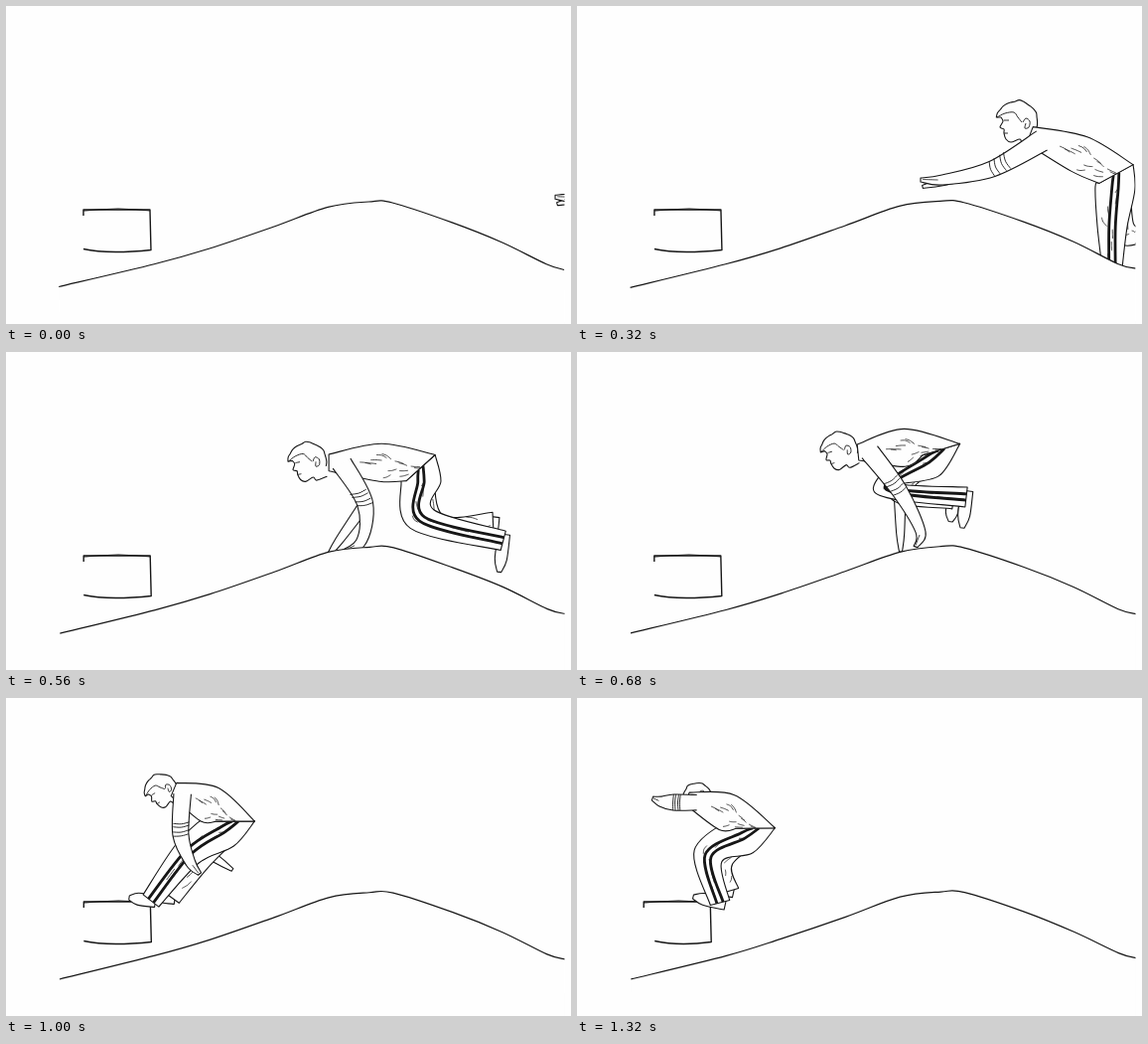
Recreate the animation shown at these times as an HTML page with a canvas. Size 569 by 320 pixels, loop 1.36 s.

```html
<!DOCTYPE html>
<html lang="en">
<head>
<meta charset="utf-8">
<title>Vault</title>
<style>
  html, body { margin: 0; width: 100%; height: 100%; overflow: hidden; background: #fefefe; }
  canvas { display: block; }
</style>
</head>
<body>
<canvas id="stage" width="569" height="320"></canvas>
<script>
const ctx = document.getElementById('stage').getContext('2d');
const LOOP = 1360, STEP = 40, RUN_END = 320, LANDING = 1000, REST = 1320;
const INK = '#161616', PAPER = '#fefefe';

// Joints at the key moments; the rest of the body is built from them.
const poses = [
  { at: RUN_END, head: [443, 116], neck: [456, 130], hip: [543, 169], knee: [539, 222], ankle: [539, 264],
    toe: [519, 274], farAnkle: [572, 229], elbow: [418, 164], wrist: [368, 175], hand: [346, 175], farHand: [348, 182] },
  { at: 480, head: [336, 116], neck: [358, 118], hip: [454, 133], knee: [483, 190], ankle: [552, 225],
    toe: [544, 252], farAnkle: [551, 191], elbow: [384, 159], wrist: [361, 192], hand: [322, 202], farHand: [326, 202] },
  { at: 680, head: [264, 99], neck: [283, 101], hip: [367, 98], knee: [314, 137], ankle: [392, 146],
    toe: [388, 177], farAnkle: [379, 149], elbow: [325, 140], wrist: [346, 181], hand: [341, 196], farHand: [326, 201] },
  { at: 840, head: [202, 88], neck: [220, 87], hip: [298, 104], knee: [230, 124], ankle: [237, 186],
    toe: [206, 185], farAnkle: [262, 182], elbow: [273, 108], wrist: [308, 127], hand: [331, 122], farHand: [332, 151] },
  { at: LANDING, head: [156, 93], neck: [169, 92], hip: [231, 124], knee: [184, 155], ankle: [146, 204],
    toe: [124, 201], farAnkle: [167, 201], elbow: [176, 138], wrist: [186, 166], hand: [195, 177], farHand: [228, 173] },
  { at: REST, head: [121, 100], neck: [111, 101], hip: [180, 131], knee: [132, 159], ankle: [144, 206],
    toe: [117, 200], farAnkle: [154, 194], elbow: [97, 105], wrist: [84, 104], hand: [76, 101], farHand: [115, 107] }
];

const hill = [[54, 283], [150, 260], [205, 244], [270, 222], [325, 202], [366, 197],
  [390, 198], [450, 218], [500, 238], [545, 260], [563, 265]];

const clamp = v => Math.max(0, Math.min(1, v));
const along = (a, b, k) => [a[0] + (b[0] - a[0]) * k, a[1] + (b[1] - a[1]) * k];
const add = (a, b, k = 1) => [a[0] + b[0] * k, a[1] + b[1] * k];
const unit = (a, b) => {
  const length = Math.hypot(b[0] - a[0], b[1] - a[1]) || 1;
  return [(b[0] - a[0]) / length, (b[1] - a[1]) / length];
};
const noise = n => { const v = Math.sin(n * 127.1) * 43758.5; return (v - Math.floor(v)) * 2 - 1; };

// Hermite blend of the joints; the landing settles to rest.
function jointsAt(t) {
  const last = poses.length - 1;
  let i = 0;
  while (i < last - 1 && t > poses[i + 1].at) i++;
  const span = poses[i + 1].at - poses[i].at, u = clamp((t - poses[i].at) / span), v = 1 - u;
  const slope = (name, axis, j) => {
    if (j === last) return 0;
    const a = poses[Math.max(0, j - 1)], b = poses[j + 1];
    return (b[name][axis] - a[name][axis]) / (b.at - a.at) * span;
  };
  const joints = {};
  for (const name of Object.keys(poses[0]).slice(1)) {
    joints[name] = [0, 1].map(axis =>
      poses[i][name][axis] * (1 + 2 * u) * v * v + poses[i + 1][name][axis] * u * u * (3 - 2 * u)
      + slope(name, axis, i) * u * v * v - slope(name, axis, i + 1) * u * u * v);
  }
  return joints;
}

// Both edges of a bent limb: every joint moved along its bisecting normal.
function edges(chain, widths) {
  const normals = chain.map((p, i) => {
    const before = i ? unit(chain[i - 1], p) : [0, 0];
    const after = i < chain.length - 1 ? unit(p, chain[i + 1]) : [0, 0];
    const [x, y] = unit([0, 0], add(before, after));
    return [y, -x];
  });
  return [1, -1].map(side => chain.map((p, i) => add(p, normals[i], side * widths[i])));
}

function curve(points) {
  const at = i => points[Math.max(0, Math.min(points.length - 1, i))];
  ctx.lineTo(...at(0));
  for (let i = 0; i < points.length - 1; i++) {
    const a = at(i - 1), b = at(i), c = at(i + 1), d = at(i + 2);
    ctx.bezierCurveTo(...add(b, add(c, a, -1), 1 / 6), ...add(c, add(d, b, -1), -1 / 6), ...c);
  }
}

function line(points, width = 1.1) {
  ctx.beginPath();
  curve(points);
  ctx.lineWidth = width;
  ctx.stroke();
}

function limb([left, right], closed) {
  ctx.beginPath();
  curve(left);
  curve([...right].reverse());
  if (closed) ctx.closePath();
  ctx.fill();
  ctx.lineWidth = 1.1;
  ctx.stroke();
}

// Point on a limb: u counts joints along it, v goes from edge to edge.
function inside([left, right], u, v) {
  const i = Math.min(left.length - 2, Math.floor(u));
  return along(along(left[i], left[i + 1], u - i), along(right[i], right[i + 1], u - i), v);
}

function wrinkles(limbEdges, count, seed) {
  const length = limbEdges[0].length - 1;
  for (let i = 0; i < count; i++) {
    const u = length * (.3 + .68 * i / count), v = .5 + noise(seed + i) * .42;
    const lean = (.5 - v) * .35 + noise(seed * 2 + i) * .06;
    line([0, .5, 1].map(k => inside(limbEdges, Math.min(length, u + k * .22), v + lean * k * k)), .75);
  }
}

function drawHead([x, y], tilt, size) {
  const at = points => points.map(([px, py]) => [
    x + size * (px * Math.cos(tilt) - py * Math.sin(tilt)),
    y + size * (px * Math.sin(tilt) + py * Math.cos(tilt))]);
  const hair = [];
  for (let i = 0; i <= 16; i++) {
    const angle = Math.PI * (1.06 + i / 16 * 1.08), r = 20.5 + noise(i + 3);
    hair.push([r * Math.cos(angle), r * Math.sin(angle)]);
  }
  const face = [[-16, -4], [-14, 0], [-17, 6], [-13, 8], [-13, 12], [-11, 18], [-6, 21], [3, 18], [6, 22], [18, 20]];
  ctx.beginPath();
  curve(at([...face].reverse()));
  curve(at(hair));
  ctx.fill();
  ctx.lineWidth = 1.1;
  ctx.stroke();
  line(at([[-20, -4], [-12, -8], [-3, -9], [1, -4], [5, 1]]), .9);
  line(at([[6, 1], [9, -3], [13, 0], [12, 6], [8, 7], [9, 2]]), .9);
  line(at([[-13, -1], [-8, -1]]), .9);
  line(at([[-13, 12], [-9, 12]]), .9);
}

function drawFoot(ankle, toe) {
  limb(edges([along(ankle, toe, -.2), along(ankle, toe, .6), toe], [6, 6, 2]), true);
}

function drawMan(t) {
  const j = jointsAt(Math.max(RUN_END, t));
  const age = Math.max(0, t - RUN_END), size = 1 - age * .0003, tilt = -age * .0008;
  const left = Math.max(0, RUN_END - t);

  const [dx, dy] = unit(j.neck, j.hip);
  const chest = add(along(j.neck, j.hip, .56), [dy, -dx], 3);
  const shoulder = along(j.neck, j.hip, .14);
  const farKnee = add(j.knee, [13, 5]);
  const farToe = add(j.farAnkle, add(j.toe, j.ankle, -1), .7);

  const spine = [j.neck, chest, j.hip, along(j.hip, j.knee, .27), j.knee, j.ankle];
  const body = edges(spine, [9 * size, 19, 19.5, 20, 15, 10]);
  const torso = body.map(side => side.slice(0, 3)), leg = body.map(side => side.slice(2));
  const farLeg = edges([j.hip, farKnee, j.farAnkle], [14, 12, 9]);
  const arm = edges([shoulder, j.elbow, j.wrist, j.hand], [11 * size, 8, 5, 2]);
  const farArm = edges([j.elbow, along(j.elbow, j.farHand, .7), j.farHand], [6, 4, 1.5]);

  ctx.save();
  ctx.translate(left * .647, left * .054 - 10 * Math.sin(Math.PI * left / RUN_END));
  limb(farArm);
  drawFoot(j.farAnkle, farToe);
  limb(farLeg, true);
  wrinkles(farLeg, 6, 31);
  drawFoot(j.ankle, j.toe);
  limb(leg, true);
  wrinkles(leg, 7, 12);
  for (const stripe of edges(spine, Array(6).fill(3.2))) line(stripe.slice(2), 2.8);
  drawHead(j.head, tilt, size);
  limb(torso, true);
  wrinkles(torso, 13, 5);
  limb(arm);
  for (const u of [.7, .78, .9, 1]) line([0, .5, 1].map(v => inside(arm, u + .12 * v * (1 - v), v)), .9);
  line([inside(arm, 2.2, .5), inside(arm, 2.9, .6)], .8);
  ctx.restore();
}

function drawBox(t, wobble) {
  const push = 11 * clamp((t - LANDING) / (REST - LANDING)), x = 78 + wobble, front = x - push;
  ctx.lineWidth = 1.4;
  ctx.beginPath();
  ctx.moveTo(front, 211);
  ctx.lineTo(front, 205);
  ctx.lineTo(front + 67, 205);
  ctx.lineTo(front + 68, 245.5);
  ctx.quadraticCurveTo(x + 24, 250, x, 244.5);
  ctx.stroke();
  line([[front, 206], [front + 35, 204], [front + 67, 206]]);
}

// The ground is redrawn by a slightly unsteady hand and creeps upward.
function drawHill(t, frame) {
  const ground = hill.map(([x, y], i) =>
    [x + noise(frame) * .8, y + noise(frame * 3 + i) * .5 - 3.5 * t / LOOP * x / 562]);
  ctx.beginPath();
  curve(ground);
  ctx.lineTo(563, 320);
  ctx.lineTo(54, 320);
  ctx.fill();
  line(ground, 1.2);
}

function draw(now) {
  const frame = Math.floor(now % LOOP / STEP), t = frame * STEP;
  ctx.fillStyle = PAPER;
  ctx.strokeStyle = INK;
  ctx.lineJoin = 'round';
  ctx.fillRect(0, 0, 569, 320);
  ctx.save();
  ctx.beginPath();
  ctx.rect(0, 0, 562.5, 320);
  ctx.clip();
  drawBox(t, noise(frame + 5) * .5);
  drawMan(t);
  drawHill(t, frame);
  ctx.restore();
}

const start = performance.now();
function tick() {
  draw(performance.now() - start);
  requestAnimationFrame(tick);
}
tick();
</script>
</body>
</html>
```
